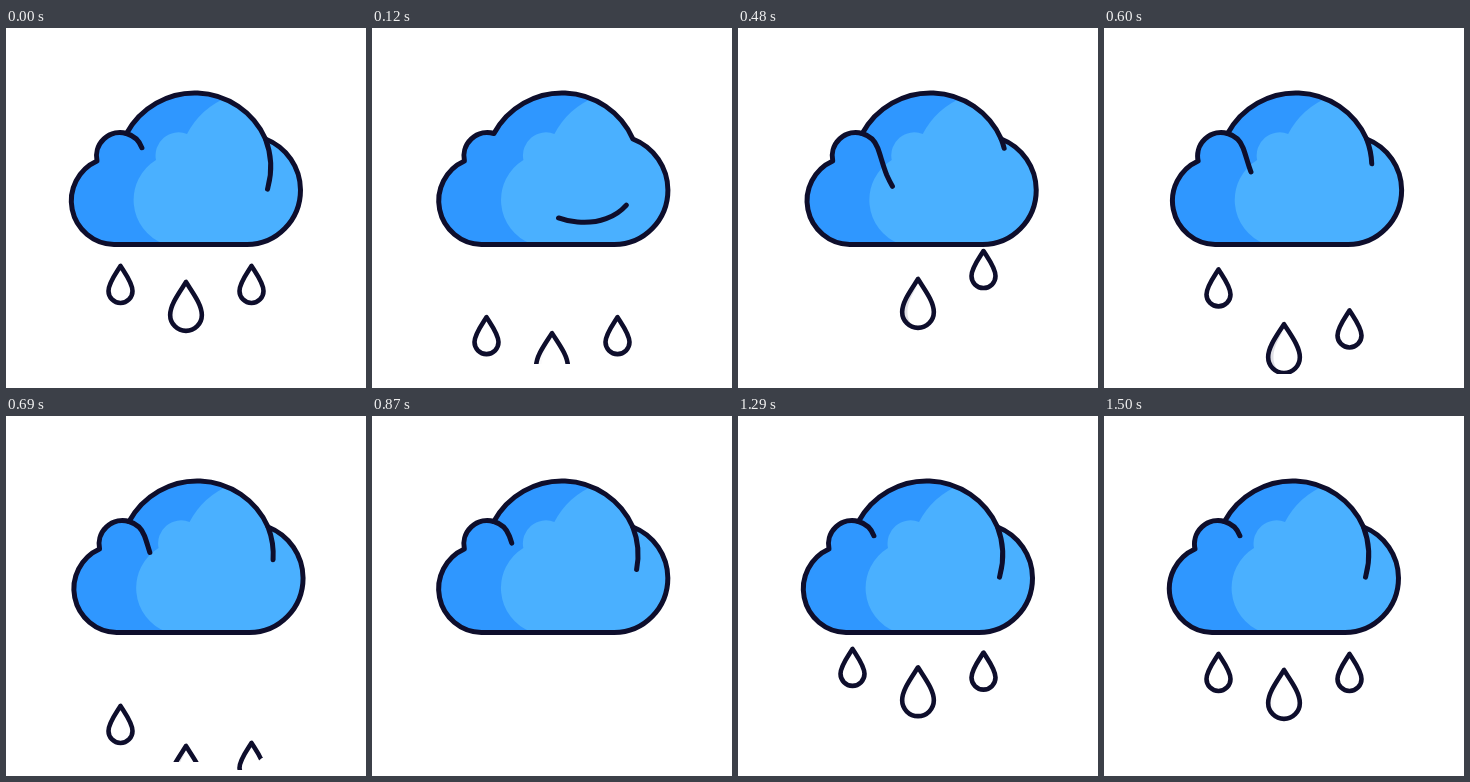
An HTML page for the animation above (1530 ms loop, 360 px wide and 360 px high).

```html
<!DOCTYPE html>
<html lang="en">
<head>
<meta charset="utf-8">
<title>Rain cloud</title>
<style>
  html, body { margin: 0; width: 100%; height: 100%; overflow: hidden; background: #fff; }
  svg { display: block; width: 100vw; height: 100vh; }
  .line { stroke: #0e0e2c; stroke-linecap: round; stroke-linejoin: round; }
</style>
</head>
<body>
<svg viewBox="0 0 360 360">
  <defs>
    <path id="drop" d="M0 0C-5 8-12 17-12 25a12 12 0 0 0 24 0C12 17 5 8 0 0Z"/>
    <path id="shape" d="M108 216.5A43.7 43.7 0 0 1 91 133A23.5 23.5 0 0 1 120.5 105.5A77.5 77.5 0 0 1 259.5 111A55 55 0 0 1 294.5 162A53.5 54.5 0 0 1 241 216.5Z"/>
    <clipPath id="inside"><use href="#shape"/></clipPath>
  </defs>
  <g id="drops"></g>
  <path id="cover" fill="#fff" d="M0 350H150V346H210V354H242L256 342H360V380H0Z"/>
  <g id="cloud">
    <use href="#shape" fill="#2f97ff"/>
    <path clip-path="url(#inside)" fill="#4ab0ff" d="M222 69A80 80 0 0 0 181 106A23 23 0 0 0 150 132A47 47 0 0 0 158 216V220H300V60Z"/>
    <use href="#shape" class="line" fill="none" stroke-width="5"/>
    <path id="fold" class="line" fill="none" stroke-width="5" d="M259.5 111A77.5 77.5 0 0 1 262 159C258 180 235 197 204 194C175 192 157 174 145 147C141 137 139 128 136 120A23.5 23.5 0 0 0 120.5 105.5"/>
  </g>
</svg>
<script>
const LOOP = 1530, STEP = 30;
const $ = id => document.getElementById(id);
const fold = $('fold'), cloud = $('cloud'), cover = $('cover');

// passY, passV: tip height at 690 ms and speed (px/ms) of the middle fall
// enterY, enterAt: where and when the last drop leaves the cloud
const drops = [
  { x: 114.5, rest: 238, size: 1,    passY: 290, passV: 0.54,  enterY: 167, enterAt: 1010 },
  { x: 180,   rest: 254, size: 1.32, passY: 330, passV: 0.376, enterY: 157, enterAt: 955 },
  { x: 245.5, rest: 238, size: 1,    passY: 327, passV: 0.495, enterY: 167, enterAt: 940 }
];

for (const d of drops) {
  const shade = d.size > 1
    ? '<path class="shade" fill="#dcdce2" d="M-1 6C-6 14-8 20-8 25c0 5 2 9 5 11C-9 35-12 31-12 25C-12 17-5 10-1 6Z"/>' : '';
  $('drops').insertAdjacentHTML('beforeend',
    `<g><use href="#drop" fill="#fff"/>${shade}` +
    `<use href="#drop" class="line" fill="none" stroke-width="${4.6 / d.size}"/></g>`);
  d.el = $('drops').lastElementChild;
}
const shade = document.querySelector('.shade');

const len = fold.getTotalLength(), dash = 73;
fold.setAttribute('stroke-dasharray', `${dash} ${len - dash}`);

const clamp = v => Math.min(1, Math.max(0, v));
const wave = u => (1 - Math.cos(Math.PI * clamp(u))) / 2;
const easeOut = u => 1 - (1 - clamp(u)) ** 3;

function tipY(d, t) {
  if (t < 240) return d.rest + 110 * (t / 200) ** 1.5;
  if (t < 900) return Math.max(160, d.passY + d.passV * (t - 690));
  return d.enterY + (d.rest - d.enterY) * easeOut((t - d.enterAt) / 480);
}

function draw(t) {
  const sway = 4.1 * (t < 300 ? wave(t / 300) : 1 - wave((t - 300) / 930));
  cloud.setAttribute('transform', `translate(${sway} 0)`);

  const turn = Math.min(1, 1.01 * (1 - Math.exp(-t / 272)));
  fold.setAttribute('stroke-dashoffset', 22 - len * turn);

  for (const d of drops)
    d.el.setAttribute('transform', `translate(${d.x} ${tipY(d, t)}) scale(${d.size})`);
  shade.setAttribute('opacity', t >= 240 && t < 900 ? 0.9 : 0.15);
  cover.setAttribute('transform', `translate(0 ${t < 240 ? -10 : 0})`);
}

const start = performance.now();
function tick() {
  const t = (performance.now() - start) % LOOP;
  draw(Math.floor(t / STEP) * STEP);
  requestAnimationFrame(tick);
}
tick();
</script>
</body>
</html>
```
